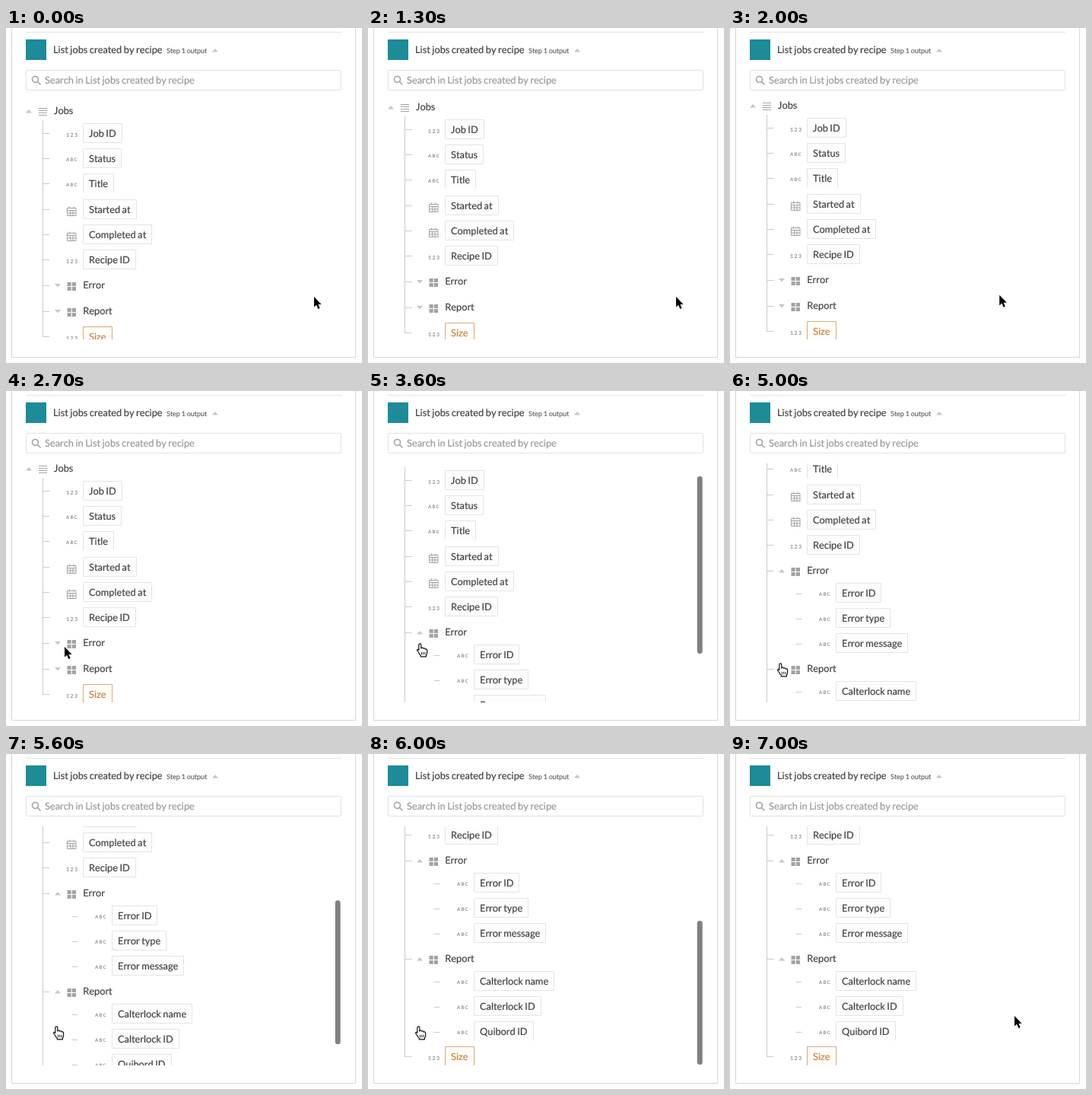
An HTML page that plays this animation: 468 by 440 pixels, repeating every 7.7 s.

```html
<!DOCTYPE html>
<html lang="en">
<head>
<meta charset="utf-8">
<title>Recipe output tree</title>
<style>
  html, body { margin: 0; width: 100%; height: 100%; overflow: hidden; background: #fdfdfd; }
  svg { display: block; }
  text {
    font: 12.8px Lato, sans-serif; font-kerning: none; word-spacing: -.058em; white-space: pre;
    text-rendering: geometricPrecision; fill: #424242; stroke: #424242; stroke-width: .2;
  }
  .small { font-size: 9px; fill: #666; stroke: #666; }
  .hint { fill: #999; stroke: #999; }
  .type { font-size: 6.2px; font-weight: 700; letter-spacing: 1.1px; fill: #8f8f8f; stroke: none; }
  .num { font-size: 7px; letter-spacing: 1.5px; }
  .line { fill: none; stroke: #cbcbcb; }
  .icon { fill: none; stroke: #a3a3a3; }
  .solid { fill: #a3a3a3; }
  .caret { fill: #c6c6c6; }
  .box { fill: #fdfdfd; stroke: #e4e4e4; }
  .hot .box { fill: #fffdfa; stroke: #d9ab74; }
  .hot .label { fill: #c5843f; stroke: #c5843f; }
</style>
</head>
<body>
<svg id="stage" width="468" height="440" viewBox="0 0 468 440"></svg>
<script>
const LOOP = 7700, STEP = 100, VIEW = 314;
const ERROR_OPENS = 3100, REPORT_OPENS = 5000;
const ERROR_SIZE = 95, REPORT_SIZE = 95;

// [time, scroll]
const scrollKeys = [[1200, 0], [1300, 5], [1400, 7], [3400, 7], [3500, 10], [3600, 21],
  [3900, 88], [4100, 102], [5200, 102], [5300, 106], [5600, 155], [5900, 194], [6000, 198]];
// [time, x, y]
const pointerKeys = [[1800, 405, 353], [2600, 80, 339], [2700, 77, 336], [3000, 69, 333],
  [4200, 69, 333], [4900, 67, 359], [6600, 67, 359], [7000, 374, 344]];
// [shown from, starts fading]
const barTimes = [[1400, 1900], [3600, 4600], [5400, 6400]];

const $ = id => document.getElementById(id);
const text = (x, y, s, cls = '') => `<text x="${x}" y="${y + 4.5}" class="${cls}">${s}</text>`;
const path = (cls, d, id = '') => `<path class="${cls}" d="${d}" id="${id}"/>`;
const caretPath = (x, y, up) => up
  ? `M${x - 4} ${y + 2.5}L${x} ${y - 2}L${x + 4} ${y + 2.5}z`
  : `M${x - 4} ${y - 2}L${x} ${y + 2.5}L${x + 4} ${y - 2}z`;

function typeIcon(kind, x, y) {
  if (kind === 'date') return path('icon',
    `M80.5 ${y - 1.5}h11.5v10h-11.5zv3h11.5M80.5 ${y + 5}h11.5M84.5 ${y + 1.5}v7M88 ${y + 1.5}v7M83.5 ${y - 3.5}v3M89 ${y - 3.5}v3`);
  const num = kind === '123';
  return `<text x="${x}" y="${y + (num ? 4.5 : 4)}" class="type ${num ? 'num' : ''}">${kind}</text>`;
}

function field(y, kind, label, { kid = false, open = false } = {}) {
  const dx = kid ? 38 : 0;
  return path('line', kid ? `M86.5 ${y + 1.5}h8` : `M48.5 ${y + .5}h9`)
    + typeIcon(kind, 79 + dx, y)
    + `<path class="box" data-x="${101.5 + dx}" data-y="${y}" data-end="${open ? '' : 'z'}"/>`
    + text(109 + dx, y, label, 'label');
}

function folder(y, label, id) {
  const cells = [[80.5, -3], [86.8, -3], [80.5, 3], [86.8, 3]]
    .map(([x, dy]) => `M${x} ${y + dy}h5.2v5h-5.2z`).join('');
  return path('line', `M48.5 ${y + 1.5}h9`) + path('caret', '', id)
    + path('solid', cells) + text(101.2, y, label);
}

const kids = { kid: true };
$('stage').innerHTML = `
  <path d="M7.5 -2V432.5H459.5V-2" fill="#fff" stroke="#d6d6d6"/>
  <path d="M26 5.5H441" stroke="#e4e4e4"/>
  <rect x="26" y="15" width="27" height="27" fill="#1d8c98"/>
  ${text(62, 28.5, 'List jobs created by recipe')}
  ${text(211, 28.5, 'Step 1 output', 'small')}
  ${path('caret', caretPath(275, 29, true))}
  <rect x="26.5" y="55.5" width="414" height="26" rx="1.5" fill="#fff" stroke="#e2e2e2"/>
  <g class="icon" stroke-width="1.6"><circle cx="38.5" cy="67.5" r="4"/><path d="M41.5 70.5l4 4"/></g>
  ${text(51, 68.5, 'Search in List jobs created by recipe', 'hint')}
  <svg y="95" width="468" height="${VIEW}" viewBox="0 95 468 ${VIEW}">
    <g id="list">
      ${path('line', '', 'trunk')}
      ${path('caret', caretPath(30, 109, true))}
      ${path('icon', 'M43 105.5h11M43 108.5h11M43 111.5h11M43 114.5h11')}
      ${text(63, 108, 'Jobs')}
      ${field(138, '123', 'Job ID')}
      ${field(171, 'ABC', 'Status')}
      ${field(204, 'ABC', 'Title', { open: true })}
      ${field(238, 'date', 'Started at')}
      ${field(271, 'date', 'Completed at')}
      ${field(304, '123', 'Recipe ID')}
      ${folder(337, 'Error', 'errorCaret')}
      <g id="errorKids">
        ${field(367, 'ABC', 'Error ID', kids)}
        ${field(400, 'ABC', 'Error type', kids)}
        ${field(433, 'ABC', 'Error message', kids)}
      </g>
      <g id="report">
        ${folder(371, 'Report', 'reportCaret')}
        <g id="reportKids">
          ${field(401, 'ABC', 'Calterlock name', kids)}
          ${field(434, 'ABC', 'Calterlock ID', kids)}
          ${field(467, 'ABC', 'Quibord ID', { kid: true, open: true })}
        </g>
      </g>
      <g id="size" class="hot">${field(405, '123', 'Size')}</g>
    </g>
  </svg>
  <rect id="bar" x="432.7" width="7" rx="3.5" fill="#808080"/>
  <g id="pointer">
    <path id="arrow" d="M0 0V13.6L3.1 10.8L5.3 16L7.6 15L5.4 10H9.6z" fill="#000" stroke="#fff" stroke-width="1.6" paint-order="stroke"/>
    <g id="hand" transform="translate(-.7 -.7)" stroke="#111" stroke-width="1.2" stroke-linejoin="round">
      <path fill="#fff" d="M-1.5 1.2q0-1.6 1.5-1.6t1.5 1.6v4.6q.3-1 1.5-.9q1.3.1 1.4 1q.3-.5 1.3-.4q1.2.2 1.4 1.3q.3-.4 1-.3q1.2.2 1.2 1.8v3q0 2-1.2 3.6v1.7h-7v-1.3q-1.5-1.5-2.6-3.6q-.7-1.4-2-2.8q-.7-1.2.3-1.8q.8-.4 1.7.9z"/>
      <path fill="none" d="M2.2 10.5v3.5M4.4 10.5v3.5M6.6 10.5v3.5" stroke-width=".9"/>
    </g>
  </g>`;

// Fit each box to its label.
for (const box of document.querySelectorAll('.box')) {
  const { x, y, end } = box.dataset;
  const right = Math.round(+x + box.nextSibling.getComputedTextLength() + 14.5) + .5;
  box.setAttribute('d', `M${x} ${+y + 12.5}V${y - 12.5}H${right}V${+y + 12.5}${end}`);
}

function at(keys, t, ease = u => u) {
  const next = keys.findIndex(k => k[0] > t);
  if (next < 0) return keys[keys.length - 1].slice(1);
  if (!next) return keys[0].slice(1);
  const a = keys[next - 1], b = keys[next], u = ease((t - a[0]) / (b[0] - a[0]));
  return a.slice(1).map((v, i) => v + (b[i + 1] - v) * u);
}
const smooth = u => u * u * (3 - 2 * u);
const show = (id, on) => $(id).style.display = on ? '' : 'none';
const move = (id, x, y) => $(id).setAttribute('transform', `translate(${x} ${y})`);

function draw(t) {
  const errorOpen = t >= ERROR_OPENS, reportOpen = t >= REPORT_OPENS;
  const reportDy = errorOpen ? ERROR_SIZE : 0;
  const sizeDy = reportDy + (reportOpen ? REPORT_SIZE : 0);
  const [scroll] = at(scrollKeys, t);

  show('errorKids', errorOpen);
  show('reportKids', reportOpen);
  $('errorCaret').setAttribute('d', caretPath(68, 338, errorOpen));
  $('reportCaret').setAttribute('d', caretPath(68, 372, reportOpen));
  $('trunk').setAttribute('d', `M48.5 121V${406 + sizeDy}`);
  move('report', 0, reportDy);
  move('size', 0, sizeDy);
  move('list', 0, -Math.round(scroll));

  const max = 8 + sizeDy;
  const length = VIEW * VIEW / (VIEW + max) - 3.5;
  const shown = barTimes.find(([a, b]) => t >= a && t < b + STEP);
  $('bar').setAttribute('y', 96 + scroll / max * (312 - length));
  $('bar').setAttribute('height', length);
  $('bar').setAttribute('opacity', !shown ? 0 : t < shown[1] ? 1 : .5);

  const onCaret = t >= 2800 && t < 6700;
  show('hand', onCaret);
  show('arrow', !onCaret);
  move('pointer', ...at(pointerKeys, t, smooth));
}

const start = performance.now();
function tick() {
  const t = (performance.now() - start) % LOOP;
  draw(Math.floor(t / STEP) * STEP);
  requestAnimationFrame(tick);
}
tick();
</script>
</body>
</html>
```
